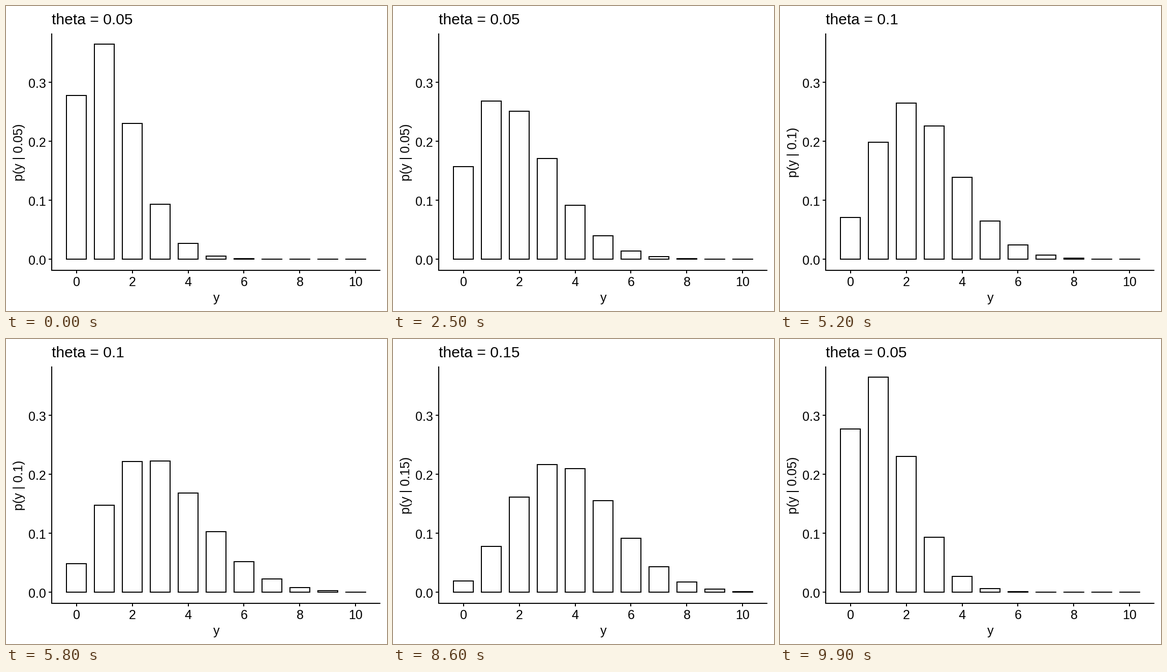
Write a matplotlib script that moves like this. It is 750 by 600 pixels and loops after 10 s.

```python
from math import ceil, comb

import matplotlib.pyplot as plt
from matplotlib.animation import FuncAnimation
from matplotlib.patches import Rectangle

plt.rcParams["font.family"] = "Liberation Sans"

W, H, DPI = 750, 600, 100
FRAMES, INTERVAL = 100, 100
TRIALS = 25
THETAS = (0.05, 0.1, 0.15)
MOVES = ((16, 17), (50, 17), (84, 16))  # last still frame, steps of the move

# plot geometry in pixels, y pointing down
LEFT, RIGHT, TOP, BOTTOM = 90, 737, 54, 520
X0, X_UNIT = 138.65, 54.97
Y0, Y_UNIT = 498.43, 1160.6
HALF_BAR = 0.35
BASE = round(Y0)

fig = plt.figure(figsize=(W / DPI, H / DPI), dpi=DPI, facecolor="white")
ax = fig.add_axes([0, 0, 1, 1])
ax.set_xlim(0, W)
ax.set_ylim(H, 0)
ax.axis("off")


def box(x0, y0, x1, y1, color="black"):
    return ax.add_patch(Rectangle((x0, y0), x1 - x0, y1 - y0, fc=color, lw=0))


def label(x, y, text, px=25, **kw):
    return ax.text(x, y, text, fontsize=px * 72 / DPI, color="black",
                   va="baseline", **kw)


def ease(t):
    return 4 * t ** 3 if t < 0.5 else 1 - 4 * (1 - t) ** 3


def binomial(y, theta):
    return comb(TRIALS, y) * theta ** y * (1 - theta) ** (TRIALS - y)


def state(frame):
    """Return theta before, theta after, eased share and the theta shown."""
    old = shown = THETAS[0]
    new, share = old, 0
    for i, (start, steps) in enumerate(MOVES):
        step = frame - start
        if step <= 0:
            break
        old, new = THETAS[i], THETAS[(i + 1) % len(THETAS)]
        share = ease(min(step / steps, 1))
        shown = new if step > ceil(steps / 2) else old
    return old, new, share, shown


# axes, ticks and tick labels
box(LEFT - 1, TOP, LEFT + 1, BOTTOM + 1)
box(LEFT - 1, BOTTOM - 1, RIGHT, BOTTOM + 1)
for k in range(4):
    y = round(Y0 - k * 0.1 * Y_UNIT)
    box(LEFT - 6, y - 1, LEFT, y + 1)
    label(44, y + 11, f"{k / 10:.1f}")
for k in range(0, 11, 2):
    center = X0 + k * X_UNIT
    x = round(center)
    box(x - 1, BOTTOM, x + 1, BOTTOM + 6)
    label(center - 6.95 * len(str(k)), 551, str(k))
label(407.5, 582, "y")

title = label(LEFT, 36, "", px=30)
y_title = label(33, 288, "", rotation=90, rotation_mode="anchor", ha="center")

# each bar is a black box with a white one inside
bars = []
for k in range(11):
    x0 = round(X0 + (k - HALF_BAR) * X_UNIT)
    x1 = round(X0 + (k + HALF_BAR) * X_UNIT)
    bars.append((box(x0 - 1, BASE - 1, x1 + 1, BASE + 1),
                 box(x0 + 1, BASE, x1 - 1, BASE, "white")))


def draw(frame):
    old, new, share, shown = state(frame)
    title.set_text(f"theta = {shown:g}")
    y_title.set_text(f"p(y | {shown:g})")
    for k, (outer, inner) in enumerate(bars):
        start, end = binomial(k, old), binomial(k, new)
        top = round(Y0 - (start + (end - start) * share) * Y_UNIT)
        outer.set_y(top - 1)
        outer.set_height(BASE - top + 2)
        gap = BASE - top - 2
        inner.set_visible(gap > 0)
        inner.set_y(top + 1)
        inner.set_height(max(gap, 0))
    return []


anim = FuncAnimation(fig, draw, frames=FRAMES, interval=INTERVAL,
                     repeat=True, repeat_delay=0, blit=False)
plt.show()
```
